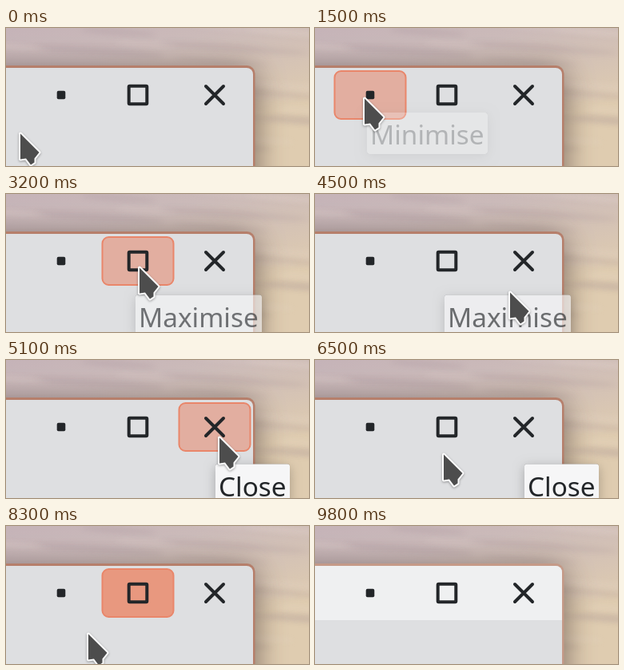
An HTML page with a canvas for the animation above (9.9 s loop, 379x173 px).

```html
<!DOCTYPE html>
<html lang="en">
<head>
<meta charset="utf-8">
<title>Window buttons</title>
<style>
html, body { margin: 0; width: 100%; height: 100%; overflow: hidden; }
canvas { display: block; width: 100vw; height: 100vh; }
</style>
</head>
<body>
<canvas id="stage" width="379" height="173"></canvas>
<script>
const W = 379, H = 173, LOOP = 9900, STEP = 100;
const INK = '#232629', PANEL = '#dedfe1';
const ctx = document.getElementById('stage').getContext('2d');

const home = { x: 17, y: 132 };
const moves = [
  { start: 300, end: 900, x: 54, y: 88 },
  { start: 1000, end: 1100, x: 61, y: 88 },
  { start: 1900, end: 2400, x: 74, y: 118 },
  { start: 2700, end: 3200, x: 166, y: 92 },
  { start: 3800, end: 4500, x: 243, y: 123 },
  { start: 4500, end: 4800, x: 266, y: 97 },
  { start: 6000, end: 6500, x: 160, y: 118 },
  { start: 6600, end: 7000, x: 168, y: 92 },
  { start: 8000, end: 8300, x: 102, y: 135 },
  { start: 8300, end: 8700, x: -40, y: 160 }
];

// Each span is [time on, time off].
const buttons = [
  { hover: [[500, 2000]], press: [] },
  { hover: [[2800, 3900], [6700, 8400]], press: [[7300, 8800]] },
  { hover: [[4600, 6100]], press: [] }
];
const tips = [
  { text: 'Minimise', x: 65, y: 106, spans: [[1400, 1900]] },
  { text: 'Maximise', x: 162, y: 126.5, spans: [[3025, 4300], [6800, 7300]] },
  { text: 'Close', x: 262, y: 130.5, spans: [[4800, 6600]] }
];

function ease(start, end, t) {
  const k = Math.min(1, Math.max(0, (t - start) / (end - start)));
  return k * k * (3 - 2 * k);
}

function visible(spans, t, fadeIn, fadeOut) {
  return Math.max(0, ...spans.map(([on, off]) =>
    ease(on, on + fadeIn, t) - ease(off, off + fadeOut, t)));
}

function pointerAt(t) {
  return moves.reduce((p, { start, end, x, y }) => {
    const k = ease(start, end, t);
    return { x: p.x + (x - p.x) * k, y: p.y + (y - p.y) * k };
  }, home);
}

function box(x, y, w, h, r) {
  ctx.beginPath();
  ctx.roundRect(x, y, w, h, r);
}

function shadow(color, blur, y = 0) {
  ctx.shadowColor = color;
  ctx.shadowBlur = blur;
  ctx.shadowOffsetY = y;
}

function randomFrom(seed) {
  return () => (seed = seed * 16807 % 2147483647) / 2147483647;
}

function drawSky() {
  const sky = ctx.createLinearGradient(0, 0, 40, H);
  sky.addColorStop(0, '#c5b3b8');
  sky.addColorStop(.35, '#cbbab9');
  sky.addColorStop(1, '#dfccb0');
  ctx.fillStyle = sky;
  ctx.fillRect(0, 0, W, H);
  const random = randomFrom(77);
  ctx.save();
  ctx.filter = 'blur(3px)';
  for (let i = 0; i < 40; i++) {
    ctx.fillStyle = i % 2 ? 'rgba(140,115,130,.13)' : 'rgba(235,222,215,.13)';
    ctx.beginPath();
    ctx.ellipse(random() * W, random() * H, 40 + random() * 60, 2 + random() * 3, .07, 0, 7);
    ctx.fill();
  }
  ctx.restore();
}

function drawWindow(active) {
  ctx.save();
  shadow('rgba(50,35,35,.6)', 38, 7);
  ctx.fillStyle = active ? '#c59a88' : '#b67f6b';
  box(-60, 47, 371.5, 220, 10);
  ctx.fill();
  ctx.restore();
  ctx.save();
  box(-60, 50, 369, 220, 8);
  ctx.clip();
  ctx.fillStyle = PANEL;
  ctx.fillRect(0, 50, W, H);
  if (active) {
    ctx.fillStyle = '#eff0f1';
    ctx.fillRect(0, 50, W, 68);
  }
  ctx.restore();
}

function drawButton({ hover, press }, index, t) {
  ctx.save();
  ctx.globalAlpha = visible(hover, t, 200, 400);
  box(24.5 + 96 * index, 54, 89, 60, 8);
  ctx.fillStyle = '#e2aea0';
  ctx.fill();
  ctx.fillStyle = `rgba(232,152,127,${visible(press, t, 200, 200)})`;
  ctx.fill();
  ctx.strokeStyle = '#e9866a';
  ctx.lineWidth = 2;
  ctx.stroke();
  ctx.restore();
}

function drawIcons() {
  ctx.fillStyle = ctx.strokeStyle = INK;
  ctx.lineWidth = 4;
  ctx.lineCap = 'round';
  box(63.7, 78.7, 10.6, 10.6, 2);
  ctx.fill();
  box(153.7, 72.7, 22.6, 22.6, 1);
  ctx.stroke();
  ctx.stroke(new Path2D('M250 73 272 95M272 73 250 95'));
}

function drawTip({ text, x, y, spans }, t) {
  ctx.save();
  ctx.globalAlpha = visible(spans, t, 300, 500);
  ctx.font = '33.33px "Noto Sans", sans-serif';
  const width = Math.round(ctx.measureText(text).width) + 8;

  // Keep the shadow outside, so a half-faded tip stays clear.
  ctx.save();
  const outside = new Path2D();
  outside.rect(0, 0, W, H);
  outside.roundRect(x, y, width, 52, 3);
  ctx.clip(outside, 'evenodd');
  shadow('rgba(0,0,0,.25)', 14, 3);
  box(x, y, width, 52, 3);
  ctx.fill();
  ctx.restore();

  ctx.fillStyle = '#f6f6f7';
  ctx.fill();
  ctx.fillStyle = INK;
  ctx.fillText(text, x + 4, y + 40);
  ctx.restore();
}

const arrow = new Path2D('M0 0V32L7 31 13 39 17.5 36V31L23.5 23.5Z');

function drawPointer(t) {
  const { x, y } = pointerAt(t);
  ctx.save();
  ctx.translate(x + 1, y + .5);
  ctx.lineJoin = 'round';
  ctx.lineWidth = 4;
  ctx.strokeStyle = '#fcfcfc';
  shadow('rgba(0,0,0,.35)', 3, 1);
  ctx.stroke(arrow);
  shadow('transparent', 0);
  ctx.fillStyle = '#4d4d4d';
  ctx.fill(arrow);
  ctx.restore();
}

function draw(t) {
  const active = t >= 9800;
  drawSky();
  drawWindow(active);
  buttons.forEach((button, index) => drawButton(button, index, t));
  drawIcons();
  tips.forEach(tip => drawTip(tip, t));
  if (!active) drawPointer(t);
}

const start = performance.now();
function tick() {
  const t = (performance.now() - start) % LOOP;
  draw(Math.floor(t / STEP) * STEP);
  requestAnimationFrame(tick);
}
tick();
</script>
</body>
</html>
```
